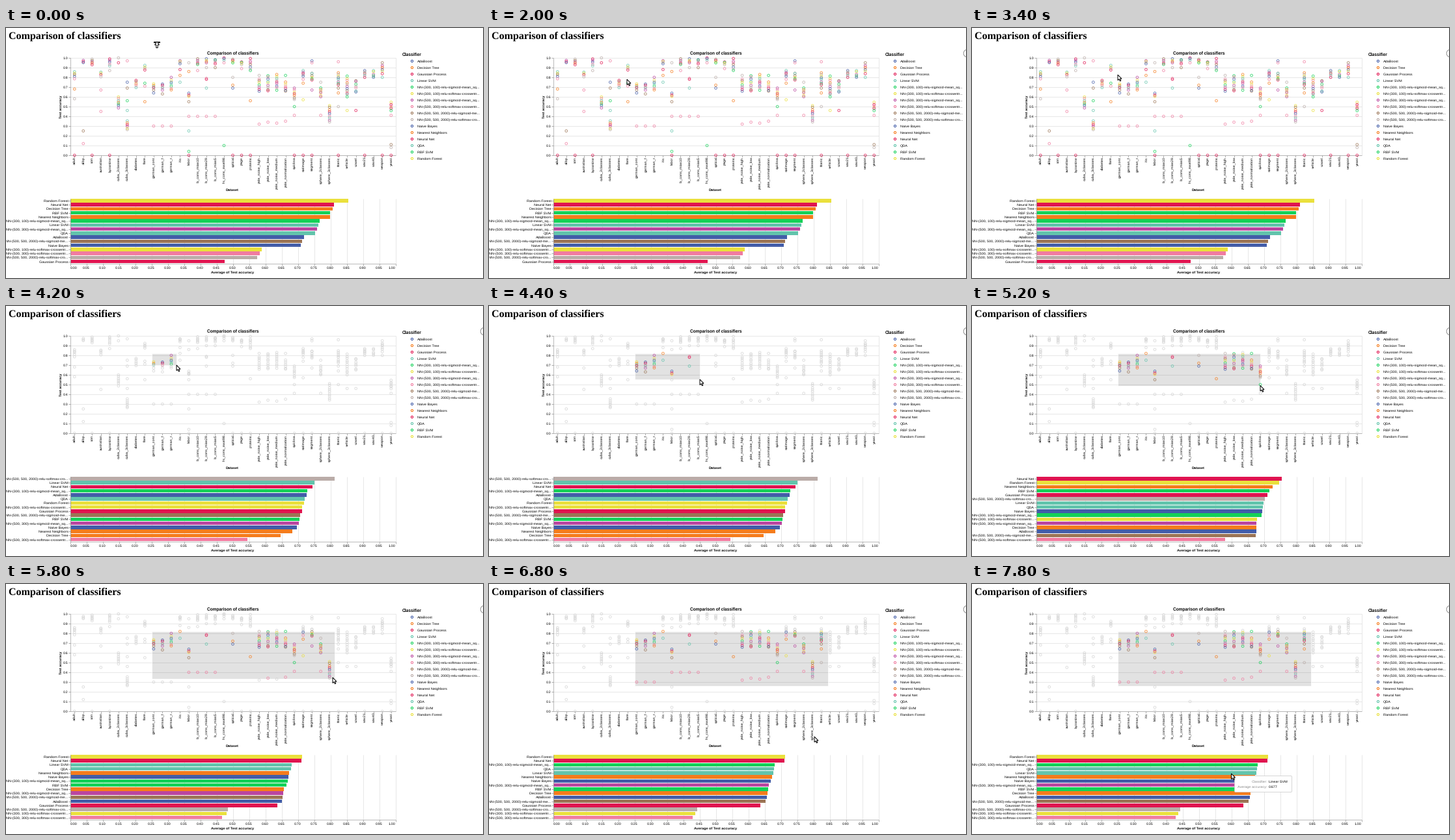
Write a matplotlib script that moves like this. It is 733 by 385 pixels and loops after 8 s.

```python
import numpy as np
import matplotlib.pyplot as plt
from matplotlib.animation import FuncAnimation
from matplotlib.patches import Circle, FancyBboxPatch, Polygon, Rectangle

W, H, DPI = 733, 385, 100
STEP, FRAMES = 200, 40
PX = 72 / DPI  # points per pixel
X0, X1, TOP, BASE = 98.5, 598.5, 46, 196
BAR_TOP, ROW = 262.8, 6.25

PALETTE = ["#435da8", "#f57c1c", "#e01450", "#62c4ac", "#14d158",
           "#eae03c", "#ba46a0", "#f07ca0", "#9b7455", "#baaca8"]
GREY = "#d3d3d3"

CLASSIFIERS = [
    "AdaBoost", "Decision Tree", "Gaussian Process", "Linear SVM",
    "NN-(300, 100)-relu-sigmoid-mean_sq...", "NN-(300, 100)-relu-softmax-crossentr...",
    "NN-(500, 300)-relu-sigmoid-mean_sq...", "NN-(500, 300)-relu-softmax-crossentr...",
    "NN-(500, 500, 2000)-relu-sigmoid-me...", "NN-(500, 500, 2000)-relu-softmax-cro...",
    "Naive Bayes", "Nearest Neighbors", "Neural Net", "QDA", "RBF SVM", "Random Forest"]

# Mean accuracy per classifier, without a brush and at brush key times
ALL_MEANS = np.array([.718, .807, .475, .763, .767, .589, .759, .583,
                      .712, .575, .709, .798, .811, .752, .799, .855])
MEAN_TIMES = [4400, 5200, 5800, 6200]
BRUSH_MEANS = np.array([
    [.727, .647, .712, .750, .728, .713, .703, .545,
     .706, .813, .697, .683, .745, .721, .705, .719],
    [.676, .6765, .711, .699, .693, .678, .677, .581,
     .675, .703, .695, .727, .755, .696, .717, .747],
    [.651, .657, .637, .680, .669, .481, .655, .467,
     .653, .485, .671, .673, .711, .679, .665, .713],
    [.657, .658, .637, .677, .681, .437, .663, .429,
     .652, .443, .668, .672, .711, .679, .660, .713]])

# Dataset: top and bottom of its main cluster, then the outliers
DATASETS = {
    "adult": (.86, .79, .68, .58, 0), "allbp": (.97, .95, .25, .12),
    "ann": (.99, .93, 0), "australian": (.86, .81, .67, .45),
    "byzantine": (.99, .92, .87, 0), "cuba_2classes": (.6, .49, 1, .95),
    "cuba_3classes": (.35, .26, .97, .75, .69, .56, .46),
    "diabetes": (.77, .70), "flare": (.92, .88, .74, .71, .55),
    "german_cont": (.73, .69, .67, .64, .30), "german_f": (.73, .69, .67, .63, .30),
    "german_r": (.77, .67, .80, .30), "iris": (.97, .94, .88, .82, .75),
    "labor": (.64, .60, .95, .86, .55, .40, .25, .04, 0),
    "lb_cons_mias10": (.99, .93, .87, .40),
    "lb_cons_mias29": (.99, .95, .90, .79, .78, .69, .40),
    "lb_cons_mias5": (.99, .94, .90, .40), "lrs_cons_swat98": (1, .98, .95, .10),
    "optical": (.98, .95, .80, .72, .69, 0), "page": (.96, .93, .89, 0),
    "proteins": (.99, .87, .56, 0), "pole_noise_high": (.78, .66, .82, .32),
    "pole_noise_low": (.82, .66, .34), "pole_noise_medium": (.83, .67, .33),
    "pole_normalization": (.75, .65, .82, .35),
    "quicksa": (.69, .57, .50, .41, 0), "satimage": (.87, .81, .78, .74, .57, 0),
    "segment": (.85, .77, .97, .95, .67, 0), "sphere_2classes": (.69, .60, .75, .41),
    "sphere_3classes": (.51, .34), "titanic": (.85, .72, .96, .69, .64, .50, 0),
    "vehicle": (.81, .60, .46), "vowel": (.77, .65, .46),
    "wav21": (.87, .82, .80, 0), "wav40": (.87, .80),
    "weapon": (.93, .84, .95, .80, 0), "yeast": (.54, .46, .41, .11, .08, 0)}

# Pointer tip and brush corner: time, x, y
POINTER = np.array([
    (0, 228, 21), (400, 228, 21), (600, 226, 42), (800, 220, 61), (1000, 220, 61),
    (1200, 248, 76), (1600, 370, 113), (2000, 212, 79), (2200, 212, 80),
    (2400, 270, 95), (2800, 370, 113), (3200, 240, 80), (3400, 224, 72),
    (4000, 224, 72), (4200, 262, 91), (4400, 324, 113), (5200, 443, 122.5),
    (5800, 502, 144), (6200, 521, 156.5), (6400, 521, 156.5), (6600, 519, 182),
    (6800, 500, 235), (7000, 450, 325), (7200, 430, 336), (7400, 394, 343),
    (7600, 415, 316), (7800, 398.5, 292)])
BRUSH_X, BRUSH_Y = 224, 73
BRUSH = np.array([(4200, 262, 91), (4400, 324, 113), (5200, 443, 122.5),
                  (5800, 505, 146), (6200, 521, 156.5)])
ARROW = np.array([(0, 0), (0, 8.5), (2, 6.7), (3.4, 9.8), (4.8, 9.2), (3.5, 6.2), (6, 6.2)])
UP_BAR = np.array([(0, 0), (9, 0), (9, 1.2), (5.5, 1.2), (8, 4.5), (5.7, 4.5),
                   (5.7, 9), (3.3, 9), (3.3, 4.5), (1, 4.5), (3.5, 1.2), (0, 1.2)])

plt.rcParams.update({"font.family": "Liberation Sans", "text.hinting": "none",
                     "toolbar": "None"})
fig = plt.figure(figsize=(W / DPI, H / DPI), dpi=DPI, facecolor="white")
ax = fig.add_axes([0, 0, 1, 1])
ax.set(xlim=(0, W), ylim=(H, 0))
ax.axis("off")


def label(x, y, text, size=5.5, ha="left", rotation=0, **style):
    """Text whose capitals are centred on the line through (x, y)."""
    shift = 0.35 * size
    dx, dy = (shift, 0) if rotation else (0, shift)
    return ax.text(x + dx, y + dy, text, fontsize=size * PX, ha=ha, va="baseline",
                   rotation=rotation, rotation_mode="anchor", **style)


def lines(kind, at, start, end, color, width=0.8, z=0):
    draw = ax.hlines if kind == "h" else ax.vlines
    draw(at, start, end, colors=color, linewidth=width * PX, zorder=z)


def along(path, t):
    return np.array([np.interp(t, path[:, 0], path[:, k]) for k in (1, 2)])


def scatter_data():
    rng = np.random.default_rng(4)
    band = (X1 - X0) / len(DATASETS)
    xs, ys, colors = [], [], []
    for i, (high, low, *outliers) in enumerate(DATASETS.values()):
        count = 3 + int((high - low) * 40)
        cluster = np.linspace(high, low, count) + rng.normal(0, .003, count)
        order = rng.permutation(len(PALETTE))
        for k, value in enumerate([*cluster, *outliers]):
            hue = order[k % len(order)]
            if value < .01:
                hue = 2
            elif k >= count and .25 < value < .46:
                hue = 7
            xs.append(X0 + band * (i + .5))
            ys.append(BASE - min(value, 1) * (BASE - TOP))
            colors.append(PALETTE[hue])
    return np.array(xs), np.array(ys), np.array(colors)


# Headings
ax.text(4, 17, "Comparison of classifiers", family="Liberation Serif",
        weight="bold", fontsize=16 * PX)
label((X0 + X1) / 2, 38, "Comparison of classifiers", 6.55, "center", weight="bold")

# Scatter axes
ticks = np.arange(11) / 10
tick_y = BASE - ticks * (BASE - TOP)
lines("h", tick_y, X0, X1, "#e2e2e2")
lines("h", tick_y, X0 - 2.75, X0, "#999999", z=3)
lines("v", [X0], TOP, BASE, "#aaaaaa", z=1)
lines("v", [X1], TOP, BASE, "#e2e2e2")
lines("h", [BASE], X0, X1, "#aaaaaa", z=1)
for value, y in zip(ticks, tick_y):
    label(95, y, f"{value:.1f}", ha="right")
label(84.5, (TOP + BASE) / 2, "Test accuracy", 5.4, "center", 90, weight="bold")
label((X0 + X1) / 2 - .5, 249, "Dataset", ha="center", weight="bold")

point_x, point_y, point_color = scatter_data()
columns = np.unique(point_x)
lines("v", columns, BASE, BASE + 2.75, "#999999", z=1)
for x, name in zip(columns, DATASETS):
    label(x, 198.5, name, ha="right", rotation=90)
points = ax.scatter(point_x, point_y, s=(3.7 * PX) ** 2, facecolors="none",
                    edgecolors=point_color, linewidths=0.95 * PX, alpha=.75, zorder=2)

# Legend
label(609, 40.5, "Classifier", 6.6, weight="bold")
for i, name in enumerate(CLASSIFIERS):
    y = 51 + 10 * i
    label(632, y, name)
    ax.add_patch(Circle((624, y), 1.6, fc="none", ec=PALETTE[i % 10], lw=1.1 * PX))

# Bar axes
grid_x = np.linspace(X0, X1, 21)
lines("v", grid_x, BAR_TOP, BAR_TOP + 16 * ROW, "#e2e2e2")
lines("v", grid_x, BAR_TOP + 16 * ROW, BAR_TOP + 16 * ROW + 2.75, "#999999")
lines("v", [X0], BAR_TOP, BAR_TOP + 16 * ROW, "#999999", z=3)
lines("h", [BAR_TOP + 16 * ROW], X0, X1, "#aaaaaa", z=1)
for i, x in enumerate(grid_x):
    label(x, 369.3, f"{i / 20:.2f}", ha={0: "left", 20: "right"}.get(i, "center"))
label((X0 + X1) / 2, 376.5, "Average of Test accuracy", ha="center", weight="bold")

row_y = BAR_TOP + ROW * (np.arange(16) + .5)
lines("h", row_y, X0 - 2.75, X0, "#999999", z=1)
bars = ax.barh(row_y, np.ones(16), height=5.6, left=X0, zorder=2)
bar_labels = [label(95.5, y, "", ha="right") for y in row_y]

# Moving parts
brush = ax.add_patch(Rectangle((BRUSH_X, BRUSH_Y), 1, 1, fc=(.2, .2, .2, .14),
                               ec="white", lw=.5, zorder=1))
side_ring = ax.add_patch(Circle((735, 39), 5.8, fc="white", ec="#777777", lw=.8 * PX))
pointer = ax.add_patch(Polygon(ARROW, fc="white", ec="black", lw=1 * PX, zorder=9))
tip_box = ax.add_patch(FancyBboxPatch((0, 0), 88, 25, boxstyle="round,pad=0,rounding_size=1.5",
                                      fc="white", ec="#cccccc", lw=.8 * PX, zorder=6))
TIP_OFFSETS = [(55, 12), (57.5, 12), (55, 20), (57.5, 20)]
tip_texts = [label(0, 0, s, ha=ha, color=c, zorder=7)
             for s, ha, c in [("Classifier:", "right", "#888888"), ("", "left", "black"),
                              ("Average accuracy:", "right", "#888888"), ("", "left", "black")]]


def show_bars(means):
    order = np.argsort(-means, kind="stable")
    for bar, text, k in zip(bars, bar_labels, order):
        bar.set_width(means[k] * (X1 - X0))
        bar.set_facecolor(PALETTE[k % 10])
        text.set_text(CLASSIFIERS[k])
    return order


def show_tooltip(t, tip, means, order):
    x, y = tip
    row = int((y - BAR_TOP) // ROW)
    hit = t >= 6600 and 0 <= row < 16 and X0 <= x <= X0 + means[order[row]] * (X1 - X0)
    for artist in (tip_box, *tip_texts):
        artist.set_visible(hit)
    if hit:
        tip_box.set_bounds(x + 5, y + 3.5, 88, 25)
        tip_texts[1].set_text(CLASSIFIERS[order[row]])
        tip_texts[3].set_text(f"{means[order[row]]:.3f}")
        for text, (dx, dy) in zip(tip_texts, TIP_OFFSETS):
            text.set_position((x + dx, y + dy + 1.9))


def update(frame):
    t = frame * STEP
    brushing = t >= BRUSH[0, 0]
    means, colors = ALL_MEANS, point_color
    brush.set_visible(brushing)
    if brushing:
        right, bottom = along(BRUSH, t)
        brush.set_bounds(BRUSH_X, BRUSH_Y, right - BRUSH_X, bottom - BRUSH_Y)
        inside = ((point_x >= BRUSH_X) & (point_x <= right + .5)
                  & (point_y >= BRUSH_Y - .5) & (point_y <= bottom))
        colors = np.where(inside, point_color, GREY)
        means = np.array([np.interp(t, MEAN_TIMES, column) for column in BRUSH_MEANS.T])
    points.set_edgecolors(list(colors))
    order = show_bars(means)

    tip = along(POINTER, t)
    pointer.set_xy(tip + (UP_BAR + (-.5, .5) if t < 200 else ARROW))
    side_ring.set_visible(t >= 600)
    show_tooltip(t, tip, means, order)
    return []


animation = FuncAnimation(fig, update, frames=FRAMES, interval=STEP,
                          repeat=True, repeat_delay=0, blit=False)
plt.show()
```
